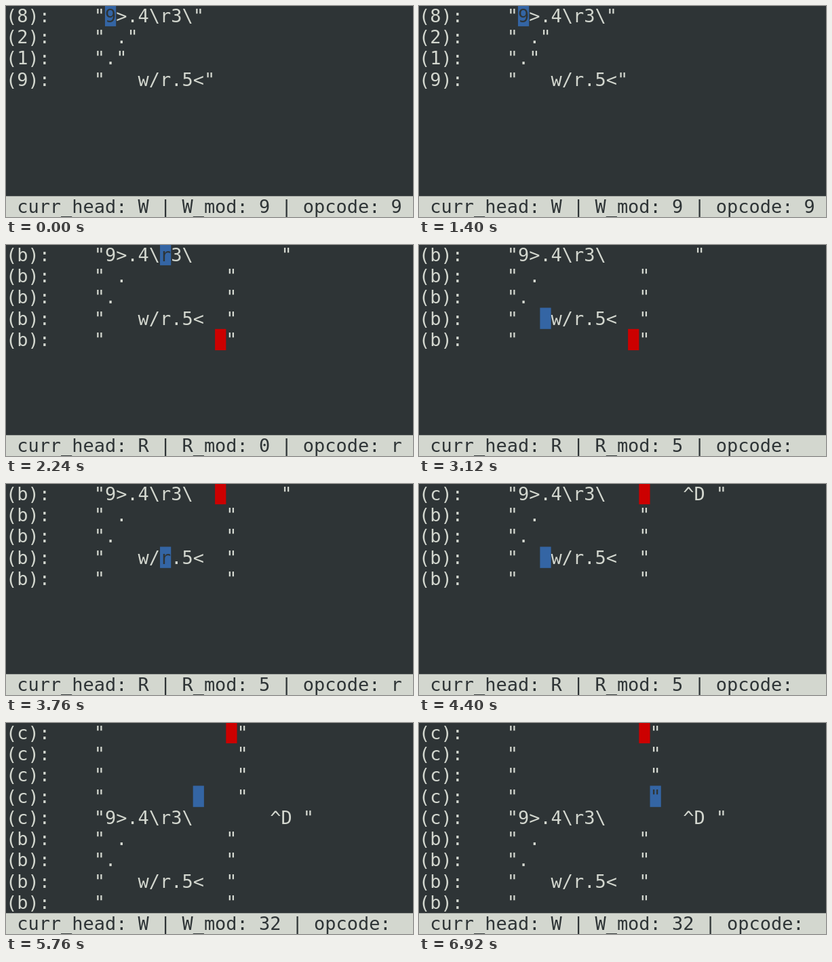
These frames come from a looping animation (600 px wide and 311 px high, 7200 ms). An HTML page with a canvas:

```html
<!DOCTYPE html>
<html>
<head>
<meta charset="utf-8">
<style>
html, body { margin: 0; width: 100%; height: 100%; overflow: hidden; background: #2e3436; }
canvas { display: block; }
</style>
</head>
<body>
<canvas width="600" height="311"></canvas>
<script>
const ctx = document.querySelector('canvas').getContext('2d');
const DARK = '#2e3436', LIGHT = '#d3d7cf', BLUE = '#3465a4', RED = '#cc0000';
const CELL_W = 600 / 37, CELL_H = 31.3, TOP = -1.4, BASELINE = 25;
const LEFT = 9, STATUS_ROW = 9;
const LOOP = 7200, TICK = 213.3, FIRST = 1420, ORIGIN = 1172.9, LAST_STEP = 25;
const DIRS = { '<': [0, -1], '>': [0, 1], '/': [-1, 0], '\\': [1, 0] };

// Runs the self-modifying program for the given number of steps.
function run(steps) {
  const rows = ['9>.4\\r3\\', ' .', '.', '   w/r.5<'];
  const heads = { R: { r: 0, c: -1, mod: 0 }, W: { r: 0, c: 0, mod: 0 } };
  const { R, W } = heads;
  let curr = 'W';

  const cell = () => rows[R.r][R.c] || ' ';

  function move(head, [dr, dc], count) {
    for (let i = 0; i < count; i++) {
      head.r += dr;
      head.c += dc;
      if (head !== W) continue;
      if (W.r < 0) { rows.unshift(''); W.r = 0; }
      rows[W.r] = (rows[W.r] || '').padEnd(W.c + 1);
    }
  }

  function write() {
    const row = rows[W.r];
    rows[W.r] = row.slice(0, W.c) + String.fromCharCode(W.mod) + row.slice(W.c + 1);
    move(W, DIRS['>'], 1);
  }

  for (let i = 0; i <= steps; i++) {
    R.c++;
    const op = cell(), head = heads[curr];
    if (op === 'w' || op === 'r') curr = op.toUpperCase();
    else if (op === '.') write();
    else if (DIRS[op]) {
      move(head, DIRS[op], head.mod);
      if (head === R) R.c--;
    }
    else if (R.c < rows[R.r].length) head.mod = op === ' ' ? 32 : +op;
  }
  return { rows, R, W, curr, mod: heads[curr].mod, op: cell() };
}

// Tabs jump to multiples of eight columns; other control codes use caret notation.
function expand(row) {
  let line = `(${row.length.toString(16)}):`.padEnd(LEFT - 1) + '"';
  for (const ch of row) {
    if (ch === '\t') line = line.padEnd((Math.floor(line.length / 8) + 1) * 8);
    else if (ch < ' ') line += '^' + String.fromCharCode(64 + ch.charCodeAt(0));
    else line += ch;
  }
  return line + '"';
}

function drawText(text, row, col, color) {
  ctx.fillStyle = color;
  [...text].forEach((ch, i) =>
    ctx.fillText(ch, (col + i) * CELL_W, TOP + row * CELL_H + BASELINE));
}

function drawBlock(row, col, width, color) {
  ctx.fillStyle = color;
  ctx.fillRect(col * CELL_W, TOP + row * CELL_H, width * CELL_W, CELL_H);
}

function drawCursor(lines, head, color) {
  const col = LEFT + head.c;
  drawBlock(head.r, col, 1, color);
  drawText(lines[head.r][col] || ' ', head.r, col, DARK);
}

function draw(t) {
  const step = t < FIRST ? 0 : Math.min(LAST_STEP, Math.max(1, Math.floor((t - ORIGIN) / TICK)));
  const { rows, R, W, curr, mod, op } = run(step);
  const lines = rows.map(expand);

  ctx.fillStyle = DARK;
  ctx.fillRect(0, 0, 600, 311);
  ctx.font = `${CELL_W / 0.60205}px "DejaVu Sans Mono", monospace`;
  lines.forEach((line, i) => drawText(line, i, 0, LIGHT));
  if (W.r !== R.r || W.c !== R.c) drawCursor(lines, W, RED);
  drawBlock(R.r, LEFT + R.c, 1, BLUE);
  drawText(lines[R.r][LEFT + R.c] || ' ', R.r, LEFT + R.c, DARK);

  drawBlock(STATUS_ROW, 0, 37, LIGHT);
  drawText(` curr_head: ${curr} | ${curr}_mod: ${mod} | opcode: ${op}`, STATUS_ROW, 0, DARK);
}

const start = performance.now();
function frame() {
  draw((performance.now() - start) % LOOP);
  requestAnimationFrame(frame);
}
frame();
</script>
</body>
</html>
```
